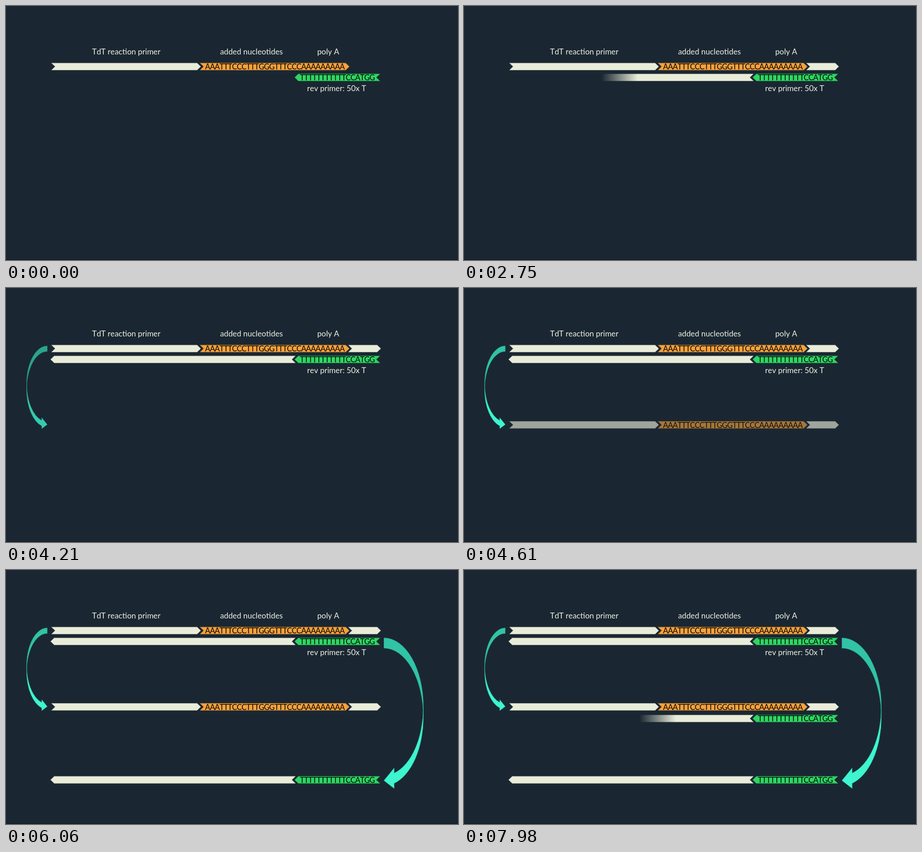
These frames come from a looping animation (998 by 561 pixels, 8000 ms). An HTML page:

```html
<!DOCTYPE html>
<html lang="en">
<head>
<meta charset="utf-8">
<title>Second strand synthesis</title>
<style>
  html, body { margin: 0; width: 100%; height: 100%; overflow: hidden; background: #1a2732; }
  svg { display: block; width: 100%; height: 100%; }
  text { font: 17.3px Lato, Carlito, sans-serif; font-kerning: none; text-anchor: middle; fill: #eef0e4; }
  .seq { font-size: 16.8px; letter-spacing: -.72px; fill: #000; }
  .cream { fill: #e9ecd9; stroke: #a9ada0; }
  .orange { fill: #f6a13c; stroke: #b4762e; }
  .green { fill: #2ed563; stroke: #229b4a; }
  .tail { fill: #31c3a6; stroke: #2aa890; }
  .head { fill: #3df5cf; stroke: #2fbfa3; }
  path { stroke-width: .8; }
</style>
</head>
<body>
<svg id="stage" viewBox="0 0 998 561"></svg>
<script>
const stage = document.getElementById('stage');
const LOOP = 8000, STEP = 40;

const label = (x, y, s) => `<text x="${x}" y="${y}">${s}</text>`;
const seq = (x, y, s) => `<text class="seq" x="${x}" y="${y + 6.4}">${s}</text>`;

// Chevron bar running from its notched end to its pointed end.
function bar(cls, from, to, y) {
  const d = Math.sign(to - from) * 8, t = y - 7.7, b = y + 7.7;
  return `<path class="${cls}" d="M${from},${t}H${to - d}L${to},${y}L${to - d},${b}H${from}L${from + d},${y}Z"/>`;
}

const primer = y => bar('cream', 100.5, 430, y);
const insert = y => bar('orange', 428.5, 758, y) + seq(593.5, y, 'AAATTTCCCTTTGGGTTTCCCAAAAAAAAA');
const end = y => bar('cream', 756, 827.5, y);
const copy = y => bar('cream', 639, 98.5, y);
const reverse = y => bar('green', 825.5, 637.5, y) + seq(731.5, y, 'TTTTTTTTTTTCCATGG');

// Crescent arrow: two equal ellipse arcs, one band apart.
function arrow(x, y, rx, ry, band, side) {
  const c1 = y + ry, c2 = c1 + band;
  const drop = ry * Math.sqrt(1 - (band / rx) ** 2), mid = c1 + drop + band / 2;
  const arc = (sweep, px, py) => `A${rx},${ry} 0 0 ${sweep} ${px},${py}`;
  return `<g transform="translate(${x}) scale(${side} 1)">
    <path class="tail" d="M0,${y}${arc(1, rx, c1)}V${c2}${arc(0, 0, y + band)}Z"/>
    <path class="head" d="M${rx},${c1}${arc(1, band, c1 + drop)}V${mid - band}L0,${y + 2 * ry + band / 2}
      L${band},${mid + band}V${c2 + drop}${arc(0, rx, c2)}Z"/></g>`;
}

// Each effect: first step time, number of steps, content; wipes also have a start and an end x.
const effects = [
  { at: 1090, n: 12, art: end(133.8), from: 755.5, to: 828 },
  { at: 1990, n: 37, art: copy(157.8), from: 639.5, to: 98 },
  { at: 3850, n: 12, art: arrow(91, 128, 45.5, 83.75, 12, -1) },
  { at: 4330, n: 12, art: primer(302.3) + insert(302.3) + end(302.3) },
  { at: 5140, n: 12, art: arrow(834.5, 150, 87, 151.9, 22.5, 1) },
  { at: 5620, n: 12, art: copy(463.5) + reverse(463.5) },
  { at: 6560, n: 11, art: reverse(328) },
  { at: 7420, n: 37, art: copy(328), from: 639.5, to: 98 }
];

const wipeDefs = i => `
  <linearGradient id="ramp${i}" gradientUnits="userSpaceOnUse" y1="0" y2="0">
    <stop stop-color="#fff"/><stop offset="1" stop-color="#fff" stop-opacity="0"/></linearGradient>
  <mask id="mask${i}" maskUnits="userSpaceOnUse" x="0" y="0" width="998" height="561">
    <rect width="998" height="561" fill="url(#ramp${i})"/></mask>`;

stage.innerHTML =
  '<rect width="998" height="561" fill="#1a2732"/><rect y="560" width="998" height="1" fill="#0d141a"/>' +
  label(265.5, 107, 'TdT reaction primer') + label(542, 107, 'added nucleotides') +
  label(711.5, 107, 'poly A') + label(730, 188, 'rev primer: 50x T') +
  primer(133.8) + insert(133.8) + reverse(157.8) +
  effects.map((e, i) => e.from
    ? `${wipeDefs(i)}<g id="fx${i}" mask="url(#mask${i})">${e.art}</g>`
    : `<g id="fx${i}">${e.art}</g>`).join('');

const groups = effects.map((e, i) => document.getElementById('fx' + i));
const ramps = effects.map((e, i) => document.getElementById('ramp' + i));

function progress(t, { at, n }) {
  const k = Math.floor((t - at) / STEP) + 1;
  return k <= 0 ? 0 : k >= n ? 1 : k / (n + (n < 20 ? .5 : 0));
}

function draw(t) {
  effects.forEach((e, i) => {
    const p = progress(t, e);
    groups[i].style.display = p ? '' : 'none';
    if (!e.from) {
      groups[i].style.opacity = p;
      return;
    }
    const soft = (e.to - e.from) * .148;
    const lead = e.from + (e.to - e.from + soft) * p;
    ramps[i].setAttribute('x1', lead - soft);
    ramps[i].setAttribute('x2', lead);
  });
}

function frame() {
  draw(performance.now() % LOOP);
  requestAnimationFrame(frame);
}
frame();
</script>
</body>
</html>
```
